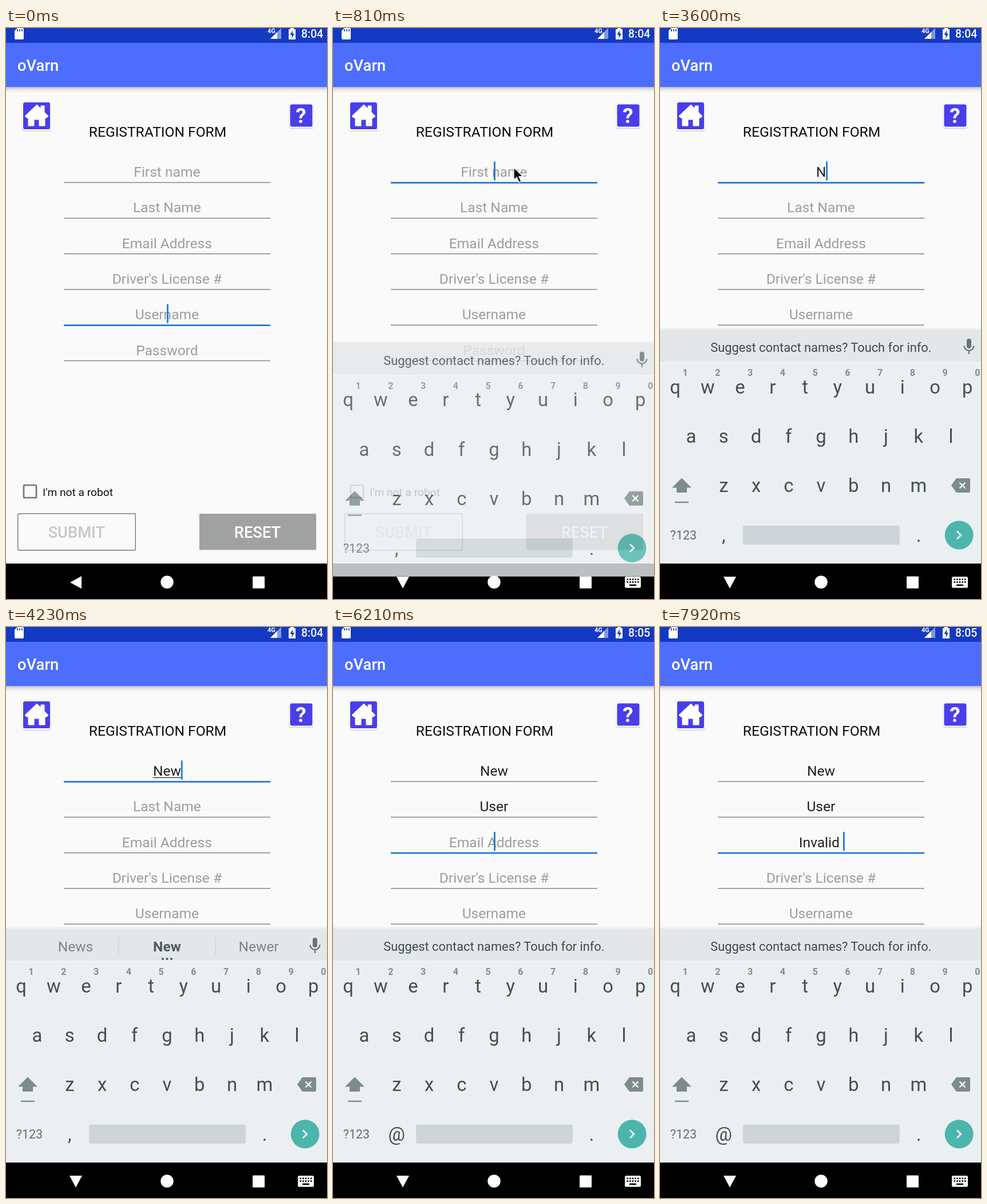
Recreate the animation shown at these times as an HTML page. Size 561 by 998 pixels, loop 8000 ms.

```html
<!DOCTYPE html>
<html lang="en">
<head>
<meta charset="utf-8">
<title>Registration form</title>
<style>
  html, body { margin: 0; width: 100%; height: 100%; overflow: hidden; background: #fafafa; }
  svg { display: block; width: 561px; height: 998px; }
  text { font-family: Roboto, sans-serif; white-space: pre; }
  .mid { text-anchor: middle; }
  .field { font-size: 24.57px; }
  .key { font-size: 32.8px; fill: #424f54; }
  .digit { font-size: 16px; font-weight: 700; fill: #848b8e; }
  .tip { font-size: 24.5px; fill: #7b8589; }
</style>
</head>
<body>
<svg id="stage" viewBox="0 0 561 998"></svg>
<script>
const LOOP = 8000, MID = 281.4, ROW = 62.3;
const HINTS = ['First name', 'Last Name', 'Email Address', "Driver's License #", 'Username', 'Password'];

// [time, focused field, typed values, composing, suggestions]
const STEPS = [
  [0, 4, []],
  [630, 0, []],
  [3420, 0, ['N']],
  [3780, 0, ['Ne'], true, ['New', 'Ne', 'Need']],
  [3960, 0, ['New'], true, ['News', 'New', 'Newer']],
  [4410, 1, ['New']],
  [4680, 1, ['New', 'U']],
  [4860, 1, ['New', 'Us'], true, ['Used', 'Us', 'Use']],
  [5040, 1, ['New', 'Use'], true, ['Used', 'Use', 'User']],
  [5220, 1, ['New', 'User'], true, ['Users', 'User', "User's"]],
  [5760, 2, ['New', 'User']],
  ...[...'Invalid '].map((c, i) => [6660 + i * 135, 2, ['New', 'User', 'Invalid '.slice(0, i + 1)]])
];
// [time, x, y] of the pointer tip
const POINTER = [[270, 570, 330], [600, 316, 244], [1080, 316, 244], [1530, 575, 300]];
const CLOCK_TICK = 5580, KEYS_IN = 710, KEYS_DONE = 980;

const text = (x, y, s, attrs = '') => `<text x="${x}" y="${y}" ${attrs}>${s}</text>`;
const rect = (x, y, w, h, fill, attrs = '') =>
  `<rect x="${x}" y="${y}" width="${w}" height="${h}" fill="${fill}" ${attrs}/>`;
const path = (d, fill, attrs = '') => `<path d="${d}" fill="${fill}" ${attrs}/>`;

function statusBar() {
  return rect(0, 0, 561, 26, '#143ac3')
    + path('M20 0H29Q31 0 31 2V18Q31 20 29 20H17Q15 20 15 18V5Z', '#fff')
    + path('M20 2v4M24 2v4M28 2v4', 'none', 'stroke="#143ac3" stroke-width="1.7"')
    + text(457, 9, '4G', 'fill="#fff" font-size="11" font-weight="700"')
    + path('M481 0V19H462Z', '#8299df') + path('M474 7V19H462Z', '#fff')
    + path('M497 0H503V2H506V20H494V2H497Z', '#fff')
    + path('M501 4L496.5 12H499.5V18L504 10H501Z', '#143ac3')
    + text(516, 17, '', 'id="clock" fill="#fff" font-size="19.4" font-weight="500"');
}

function tile(x, y, size) {
  return rect(x - 2, y - 1, size + 4, size + 5, '#d9d9de', 'rx="4"')
    + rect(x - 1.5, y - 2, size + 3, size + 4, '#fff', 'rx="4"')
    + rect(x, y, size, size, '#493eea', 'rx="3"');
}

function header() {
  return rect(0, 103, 561, 10, 'url(#shade)') + rect(0, 26, 561, 77, '#4d6dfd')
    + text(20, 75, 'oVarn', 'fill="#fff" font-size="27.3" font-weight="500"')
    + tile(30, 130, 47)
    + path('M54 134L61 141V136H67V147L74 154L71 157H68V171H58V160H49V171H39V157H36L33 154Z', '#fff',
      'stroke="#fff" stroke-linejoin="round"')
    + tile(496.5, 133.5, 39)
    + text(515.5, 165.5, '?', 'class="mid" fill="#fff" font-size="37" font-weight="700"')
    + text(265, 190, 'REGISTRATION FORM', 'class="mid" font-size="24.57" fill="#0c0c0c"');
}

function formBottom() {
  return rect(31, 799, 22, 22, 'none', 'rx="1.5" stroke="#757575" stroke-width="2.7"')
    + text(64, 818, "I'm not a robot", 'font-size="19.2" fill="#111"')
    + rect(20.7, 848.7, 205.6, 64, '#fafafa', 'rx="2.5" stroke="#777" stroke-width="1.4"')
    + text(123.3, 891, 'SUBMIT', 'class="mid" font-size="27.3" font-weight="500" fill="#c8c8c8"')
    + rect(336, 848, 207, 66, '#efefef', 'rx="2"') + rect(338, 849, 204, 63, '#a0a2a1', 'rx="1"')
    + text(439.5, 891, 'RESET', 'class="mid" font-size="27.3" font-weight="500" fill="#fff"');
}

function navBar() {
  let dots = '';
  for (let i = 0; i < 10; i++)
    dots += rect(513.5 + i % 5 * 4.6, 962.5 + (i > 4) * 4.6, 2.6, 2.6, '#000');
  return rect(0, 936, 561, 62, '#000')
    + path('M112 969L132 958V980Z', '#fff', 'id="back"')
    + `<circle cx="281.5" cy="968.5" r="11.2" fill="#fff"/>`
    + rect(431, 958.5, 21, 21, '#fff', 'rx="1"')
    + `<g id="imeIcon">${rect(510, 959, 28, 19.5, '#fff', 'rx="2.5"')}${dots}${rect(518, 972.5, 12, 2.6, '#000')}</g>`;
}

function keyboard() {
  const letters = (row, x, y) => [...row].map((c, i) => text(x + i * 56.75, y, c, 'class="key mid"')).join('');
  const digits = [...'1234567890'].map((c, i) => text(44 + i * 56.75, 608, c, 'class="digit mid"')).join('');
  const grey = '#7c8b8e';
  return rect(0, 524, 561, 3, '#000', 'opacity=".035"')
    + rect(0, 527, 561, 57, '#e4e7e8') + rect(0, 584, 561, 352, '#eceff1')
    + rect(0, 583.5, 561, 1.4, '#f4f6f7')
    + text(MID, 566, 'Suggest contact names? Touch for info.', 'id="notice" class="mid" font-size="21.84" fill="#3c4a50"')
    + '<g id="tips">' + text(121.5, 566.5, '', 'class="tip mid"')
    + text(MID, 566.5, '', 'class="tip mid" style="font-weight:700;fill:#4d5b61"')
    + text(441.5, 566.5, '', 'class="tip mid"')
    + rect(196, 541, 1.3, 33, '#cfd4d6') + rect(365.5, 541, 1.3, 33, '#cfd4d6')
    + [274, 281.5, 289].map(x => `<circle cx="${x}" cy="580" r="2.1" fill="#4d5b61"/>`).join('') + '</g>'
    + `<g id="mic">${rect(536, 543, 8, 17, '#65757b', 'rx="4"')}`
    + path('M531.5 555.5a8.5 8.5 0 0 0 17 0M540 564v6', 'none', 'stroke="#65757b" stroke-width="2.3"') + '</g>'
    + digits + letters('qwertyuiop', 26.5, 638.5) + letters('asdfghjkl', 54.5, 725) + letters('zxcvbnm', 111.3, 811)
    + path('M38 786.5L55 803.5H47V812H29V803.5H21Z', grey) + rect(26, 827.7, 24, 2.4, grey)
    + path('M509 799.5L518 787H540Q542 787 542 789V810Q542 812 540 812H518Z', grey)
    + path('M523.5 794.5l10 10m0-10l-10 10', 'none', 'stroke="#fff" stroke-width="2.4"')
    + text(41, 894, '?123', 'class="mid" font-size="21.5" fill="#616d72"')
    + text(111.3, 898, ',', 'id="comma" class="key mid"')
    + rect(145, 869.5, 274, 33.5, '#cdd5d9', 'rx="4"') + text(452, 898, '.', 'class="key mid"')
    + `<circle cx="522.7" cy="886.3" r="25" fill="#4cb6ac"/>`
    + path('M519 879.5l6.8 6.8l-6.8 6.8', 'none', 'stroke="#fff" stroke-width="2.6"');
}

const fieldRows = HINTS.map((_, i) =>
  `<g class="row">${text(MID, 260 + i * ROW, '', 'class="field mid"')}${rect(101, 0, 361, 1.4, '#808080')}</g>`).join('');

document.getElementById('stage').innerHTML =
  `<defs><linearGradient id="shade" x2="0" y2="1"><stop stop-color="#bcbcc0"/>
   <stop offset=".45" stop-color="#e6e6e8"/><stop offset="1" stop-color="#fafafa"/></linearGradient></defs>`
  + rect(0, 0, 561, 998, '#fafafa') + header() + statusBar() + fieldRows
  + rect(0, 0, 0, 1.2, '#212121', 'id="compose"') + rect(0, 0, 2.7, 33, '#1976d8', 'id="caret"')
  + formBottom() + navBar() + `<g id="keys">${keyboard()}</g>`
  + path('M0 0V21.5L5 17L9 26L13 24L9 15.5H16Z', '#000', 'id="pointer" stroke="#fff" stroke-width="1.4"');

const $ = id => document.getElementById(id);
const rows = [...document.querySelectorAll('.row')];
const tipTexts = [...$('tips').querySelectorAll('text')];
const show = (el, on) => el.setAttribute('visibility', on ? 'visible' : 'hidden');
const place = (el, attrs) => Object.entries(attrs).forEach(([k, v]) => el.setAttribute(k, v));

function drawFields([, focus, values, composing]) {
  rows.forEach((row, i) => {
    const [label, line] = row.children, active = i === focus;
    label.textContent = values[i] || HINTS[i];
    label.setAttribute('fill', values[i] ? '#212121' : '#9d9d9d');
    place(line, { y: 269.4 + i * ROW - (active ? .3 : 0), height: active ? 2.7 : 1.4, fill: active ? '#1976d8' : '#808080' });
  });
  const width = values[focus] ? rows[focus].firstChild.getComputedTextLength() : 0;
  place($('caret'), { x: MID + width / 2 - (width ? 0 : .3), y: 233.5 + focus * ROW });
  place($('compose'), { x: MID - width / 2, y: 262.6 + focus * ROW, width });
  show($('compose'), composing);
}

function drawKeyboard(t, [, focus, , , tips]) {
  const p = Math.min(1, Math.max(0, (t - KEYS_IN) / (KEYS_DONE - KEYS_IN)));
  const ease = 1 - (1 - p) ** 2;
  place($('keys'), { opacity: Math.min(1, ease * 1.32), transform: `translate(0 ${(1 - ease) * 58})` });
  const up = t >= KEYS_IN;
  show($('keys'), up);
  show($('imeIcon'), up);
  $('back').setAttribute('d', up ? 'M111 959H133L122 979.5Z' : 'M112 969L132 958V980Z');
  show($('notice'), up && !tips);
  show($('tips'), up && tips);
  (tips || []).forEach((s, i) => { tipTexts[i].textContent = s; });
  show($('mic'), up && focus !== 2);
  $('comma').textContent = focus === 2 ? '@' : ',';
}

function drawPointer(t) {
  const i = POINTER.findIndex(p => p[0] > t);
  show($('pointer'), i > 0);
  if (i < 1) return;
  const [t0, x0, y0] = POINTER[i - 1], [t1, x1, y1] = POINTER[i];
  const p = (t - t0) / (t1 - t0), e = p * p * (3 - 2 * p);
  $('pointer').setAttribute('transform', `translate(${x0 + (x1 - x0) * e} ${y0 + (y1 - y0) * e})`);
}

const start = performance.now();
let current;
function frame(now) {
  const t = Math.max(0, now - start) % LOOP;
  const step = STEPS.filter(s => s[0] <= t).pop();
  if (step !== current) drawFields(current = step);
  show($('caret'), (t - step[0]) % 1000 < 500);
  $('clock').textContent = t < CLOCK_TICK ? '8:04' : '8:05';
  drawKeyboard(t, step);
  drawPointer(t);
  requestAnimationFrame(frame);
}
frame(start);
</script>
</body>
</html>
```
